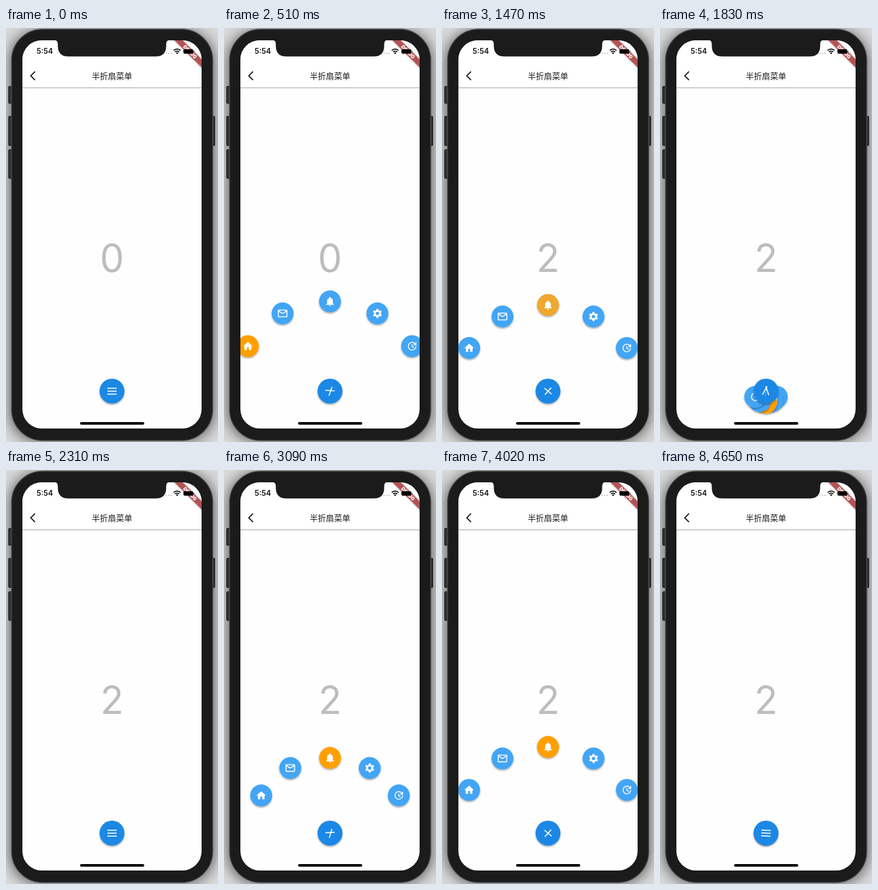
These frames come from a looping animation (362 by 706 pixels, 4680 ms). An HTML page:

```html
<!DOCTYPE html>
<html lang="zh">
<head>
<meta charset="utf-8">
<title>Fan menu</title>
<style>
  html, body { margin: 0; width: 100%; height: 100%; overflow: hidden; background: #d2d2d2; }
  svg { display: block; width: 362px; height: 706px; }
  text { text-anchor: middle; }
  .glyph { fill: #fff; stroke: none; }
  .line { fill: none; stroke: #fff; stroke-width: 2; }
</style>
</head>
<body>
<svg viewBox="0 0 362 706">
  <defs>
    <clipPath id="screen"><rect x="28" y="21" width="306" height="662" rx="33"/></clipPath>
    <filter id="halo" x="-20%" y="-20%" width="140%" height="140%"><feGaussianBlur stdDeviation="11"/></filter>
    <filter id="lift" x="-40%" y="-40%" width="180%" height="180%">
      <feDropShadow dx="0" dy="1.8" stdDeviation="1.4" flood-color="#000" flood-opacity=".36"/>
    </filter>
    <filter id="soft" x="-20%" y="-60%" width="140%" height="220%">
      <feDropShadow dx="0" dy="0" stdDeviation="1.6" flood-color="#000" flood-opacity=".45"/>
    </filter>
    <filter id="barShadow" x="-5%" y="-10%" width="110%" height="130%">
      <feDropShadow dx="0" dy="1.2" stdDeviation="1.2" flood-color="#000" flood-opacity=".34"/>
    </filter>
  </defs>

  <!-- phone -->
  <rect width="362" height="706" fill="#d8d8d8"/>
  <rect x="6" y="4" width="350" height="702" rx="52" fill="#000" opacity=".55" filter="url(#halo)"/>
  <g fill="#333" stroke="#111">
    <rect x="4.5" y="99.500" width="8" height="29" rx="1.500"/>
    <rect x="4.5" y="150.500" width="8" height="50" rx="1.500"/>
    <rect x="4.5" y="207.500" width="8" height="49" rx="1.500"/>
    <rect x="349.500" y="150.500" width="7" height="50" rx="1.500"/>
  </g>
  <rect x="9.500" y="2" width="343.500" height="701.500" rx="53" fill="#1b1b1b" stroke="#4c4c4c" stroke-width="1.500"/>

  <g clip-path="url(#screen)">
    <rect x="28" y="21" width="306" height="662" fill="#fefefe"/>
    <rect x="22" y="15" width="318" height="86" fill="#fff" filter="url(#barShadow)"/>
    <path d="M49.500 74.300 42.300 81.500l7.200 7.200" fill="none" stroke="#222" stroke-width="2"/>
    <text x="181" y="86.700" font-size="13.800" font-weight="500" fill="#1c1c1c"
      font-family="'Noto Sans CJK SC','Noto Sans CJK',sans-serif">半折扇菜单</text>
    <text id="count" x="181" y="416" font-size="65.500" fill="#bdbdbd" font-family="Inter,Roboto,sans-serif">0</text>

    <g id="items"></g>
    <g transform="translate(181 619.300)">
      <circle r="21.300" fill="#1e88e5" filter="url(#lift)"/>
      <g id="bars" stroke="#fff" stroke-width="1.700">
        <path d="M-8 0H8"/><path d="M-8 0H8"/><path d="M-8 0H8"/>
      </g>
    </g>

    <g transform="translate(334 21) rotate(45)">
      <rect x="-40" y="22.900" width="80" height="9.800" fill="#b35255" filter="url(#soft)"/>
      <text y="30.800" font-size="8.300" font-weight="900" fill="#fff" font-family="Inter,Roboto,sans-serif">DEBUG</text>
    </g>

    <!-- status bar -->
    <text x="66.200" y="44.300" font-size="12.700" font-weight="600" fill="#111" font-family="Inter,sans-serif">5:54</text>
    <path d="M268 43.200h15" stroke="#bbb" stroke-width="2" stroke-dasharray="2 2.300"/>
    <g fill="none" stroke="#000" stroke-width="1.900">
      <path d="M286.400 38.300a8.200 8.200 0 0 1 11.600 0M288.700 40.900a5 5 0 0 1 7 0"/>
      <path d="M292.200 44.500l-1.900-2a2.700 2.700 0 0 1 3.800 0z" fill="#000" stroke="none"/>
    </g>
    <rect x="303" y="36.300" width="16.500" height="7.400" rx="2" fill="#000"/>
    <path d="M321 38.500v3" stroke="#555" stroke-width="1.200"/>
    <rect x="126.500" y="672" width="109.500" height="4.500" rx="2.250" fill="#000"/>
  </g>
  <path d="M82 20.500q6.500 0 6.500 7v3q0 18 18 18h149q18 0 18-18v-3q0-7 6.500-7z" fill="#1b1b1b"/>
</svg>

<script>
const LOOP = 4680, DURATION = 900, REST_RADIUS = 145.8, X_STRETCH = 1.06;
const CENTER = { x: 181, y: 619 };
const BLUE = '#42a5f5', AMBER = '#ffa000';
const PICK_TIME = 1320;
const moves = [
  { start: 10, open: true }, { start: 1305, open: false },
  { start: 2608, open: true }, { start: 3850, open: false }
];

const gearTeeth = [0, 60, 120, 180, 240, 300]
  .map(a => `<path class="line" style="stroke-width:4.2" d="M12 6.500V2.400" transform="rotate(${a} 12 12)"/>`).join('');
const icons = [
  '<path class="glyph" d="M10 20v-6h4v6h5v-8h3L12 3 2 12h3v8z"/>',
  '<rect class="line" x="3" y="5" width="18" height="14" rx="1"/><path class="line" d="M3 6.500l9 5.600 9-5.600"/>',
  '<path class="glyph" d="M12 22a2 2 0 0 0 2-2h-4a2 2 0 0 0 2 2zm6-6v-5c0-3.100-1.600-5.600-4.500-6.300V4a1.500 1.500 0 0 0-3 0v.7C7.600 5.400 6 7.900 6 11v5l-2 2v1h16v-1z"/>',
  `<circle class="line" cx="12" cy="12" r="5.400" style="stroke-width:3.800"/>${gearTeeth}`,
  '<path class="line" d="M20 12.100A8 8 0 1 1 17.700 6.400M11.800 8v4.600l3.900 2.300" style="stroke-width:1.900"/><path class="glyph" d="M21 3v7.100h-6.800z"/>'
];

const itemLayer = document.getElementById('items');
const count = document.getElementById('count');
const bars = [...document.querySelectorAll('#bars path')];

itemLayer.innerHTML = icons.map(icon => `
  <g><circle r="18.700" filter="url(#lift)"/><circle class="press" r="18.700" fill="#bcbcbc" opacity="0"/>
  <g transform="scale(.816) translate(-12 -12)">${icon}</g></g>`).join('');
const items = [...itemLayer.children].map((node, i) => {
  const angle = Math.PI * (1 - (i + 1) / 6);
  return {
    node, disc: node.querySelector('circle'), press: node.querySelector('.press'),
    dx: Math.cos(angle) * X_STRETCH, dy: -Math.sin(angle)
  };
});

const clamp = v => Math.min(1, Math.max(0, v));

function elasticInOut(p) {
  const u = 2 * p - 1;
  const wave = 0.5 * Math.pow(2, -10 * Math.abs(u)) * Math.sin((u - 0.1) * 5 * Math.PI);
  return u < 0 ? -wave : 1 + wave;
}

// cubic-bezier(.55, 0, .2, 1)
function easeTurn(x) {
  let lo = 0, hi = 1;
  for (let i = 0; i < 24; i++) {
    const s = (lo + hi) / 2, r = 1 - s;
    if (3 * s * r * r * 0.55 + 3 * s * s * r * 0.2 + s * s * s < x) lo = s; else hi = s;
  }
  return lo * lo * (3 - 2 * lo);
}

function progressAt(t) {
  const move = moves.filter(m => m.start <= t).pop();
  if (!move) return 0;
  const p = clamp((t - move.start) / DURATION);
  return move.open ? p : 1 - p;
}

function drawBars(p) {
  const e = easeTurn(p), gap = 5 * (1 - e);
  const turns = [135 * e, 180 * e, 225 * e];
  bars.forEach((bar, i) => {
    bar.setAttribute('transform', `rotate(${turns[i]}) translate(0 ${(i - 1) * gap})`);
  });
  bars[1].setAttribute('opacity', clamp(1 - 1.5 * e));
}

function render(t) {
  const p = progressAt(t), radius = REST_RADIUS * elasticInOut(p);
  const picked = t >= PICK_TIME;
  const selected = picked ? 2 : 0;
  count.textContent = selected;
  itemLayer.setAttribute('visibility', p > 0 ? 'visible' : 'hidden');
  items.forEach((item, i) => {
    const x = CENTER.x + item.dx * radius, y = CENTER.y + item.dy * radius;
    item.node.setAttribute('transform', `translate(${x} ${y})`);
    item.disc.setAttribute('fill', i === selected ? AMBER : BLUE);
  });
  items[2].press.setAttribute('opacity', picked ? 0.4 * clamp(1 - (t - PICK_TIME) / 400) : 0);
  drawBars(p);
}

const begin = performance.now();
function tick() {
  render((performance.now() - begin) % LOOP);
  requestAnimationFrame(tick);
}
render(0);
requestAnimationFrame(tick);
</script>
</body>
</html>
```
